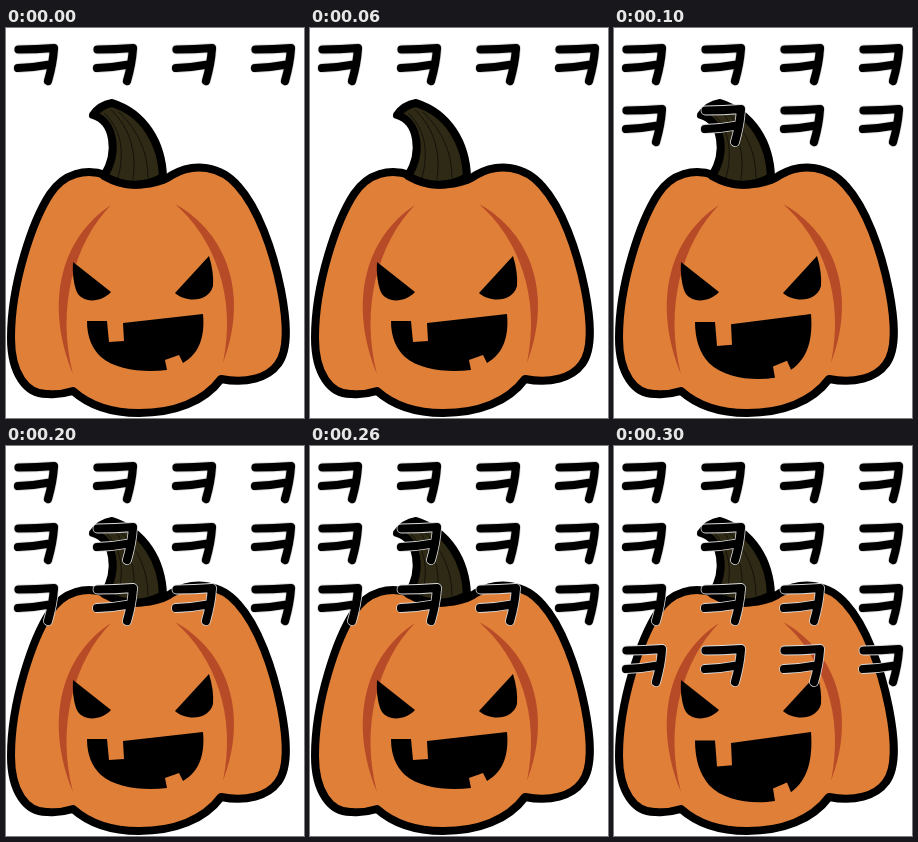
These frames come from a looping animation (298 by 390 pixels, 0.4 s). An HTML page:

```html
<!DOCTYPE html>
<html lang="ko">
<head>
<meta charset="utf-8">
<title>Laughing pumpkin</title>
<style>
  html, body { margin: 0; width: 100%; height: 100%; overflow: hidden; background: #fff; }
  svg { display: block; width: 298px; height: 390px; }
  .outline { stroke: #000; stroke-width: 8; stroke-linejoin: round; }
  .letter { fill: none; stroke-linecap: round; stroke-linejoin: round; }
  .rim { stroke: #ddd; stroke-width: 9.8; }
  .ink { stroke: #000; stroke-width: 8.2; }

  .row, .mouth { animation: 400ms step-end infinite; }
  .second { animation-name: second; }
  .third { animation-name: third; }
  .fourth { animation-name: fourth; }
  .mouth { animation-name: laugh; transform-origin: 140px 286px; }
  @keyframes second { 0% { visibility: hidden; } 25%, 100% { visibility: visible; } }
  @keyframes third { 0% { visibility: hidden; } 50%, 100% { visibility: visible; } }
  @keyframes fourth { 0% { visibility: hidden; } 75%, 100% { visibility: visible; } }
  @keyframes laugh {
    0%, 50% { transform: none; }
    25% { transform: scaleY(1.14); }
    75%, 100% { transform: scaleY(1.23); }
  }
</style>
</head>
<body>
<svg viewBox="0 0 298 390" role="img" aria-label="ㅋㅋㅋㅋ">
  <defs>
    <path id="strokes" d="M12.500 21.500 Q30 21.500 48 20 Q47 36 42 53 M12 40 Q28 39.500 44 36.500"/>
    <g id="letter" class="letter">
      <use href="#strokes" class="rim"/>
      <use href="#strokes" class="ink"/>
    </g>
    <g id="laugh">
      <use href="#letter"/>
      <use href="#letter" x="79"/>
      <use href="#letter" x="158"/>
      <use href="#letter" x="237"/>
    </g>
  </defs>

  <path class="outline" fill="#e08038" d="M100 147 C80 140 58 145 44 166 C27 192 5 255 5 310
    C5 345 20 367 42 366 Q54 367 67 363 C85 379 108 385 133 385 C168 385 198 374 215 351
    C240 356 262 350 272 336 C284 320 280 288 275 262 C267 222 252 180 232 158
    C215 138 188 134 166 147 Q162 150 157 152 C140 158 115 160 100 147Z"/>

  <g fill="#b84b27">
    <path d="M105 177 C55 210 38 275 67 346 C50 280 68 215 105 177Z"/>
    <path d="M169 176 C222 205 243 268 217 335 C231 268 208 210 169 176Z"/>
  </g>

  <path class="outline" fill="#2f2a15" d="M87 87 Q94 77 106 75 C138 85 156 115 157 149
    Q128 165 98 148 C113 124 108 93 87 87Z"/>
  <g fill="none" stroke="#15120a">
    <path d="M98 85 Q123 108 112 150"/>
    <path d="M105 82 Q133 108 127 152"/>
    <path d="M113 84 Q142 112 142 150"/>
  </g>

  <path d="M67 234 L105 264 C95 275 75 276 70 262 Q66 250 67 234Z"/>
  <path d="M203 228 L169 265 C180 275 203 274 207 258 Q208 244 203 228Z"/>
  <path class="mouth" d="M81 293 L101 293 L103 314 L118 313 L117 295 L197 286
    C199 308 194 325 177 335 L173 327 L159 332 L161 342
    C138 345 110 342 95 329 Q81 316 81 293Z"/>

  <use href="#laugh"/>
  <use href="#laugh" class="row second" y="61"/>
  <use href="#laugh" class="row third" y="122"/>
  <use href="#laugh" class="row fourth" y="183"/>
</svg>
</body>
</html>
```
